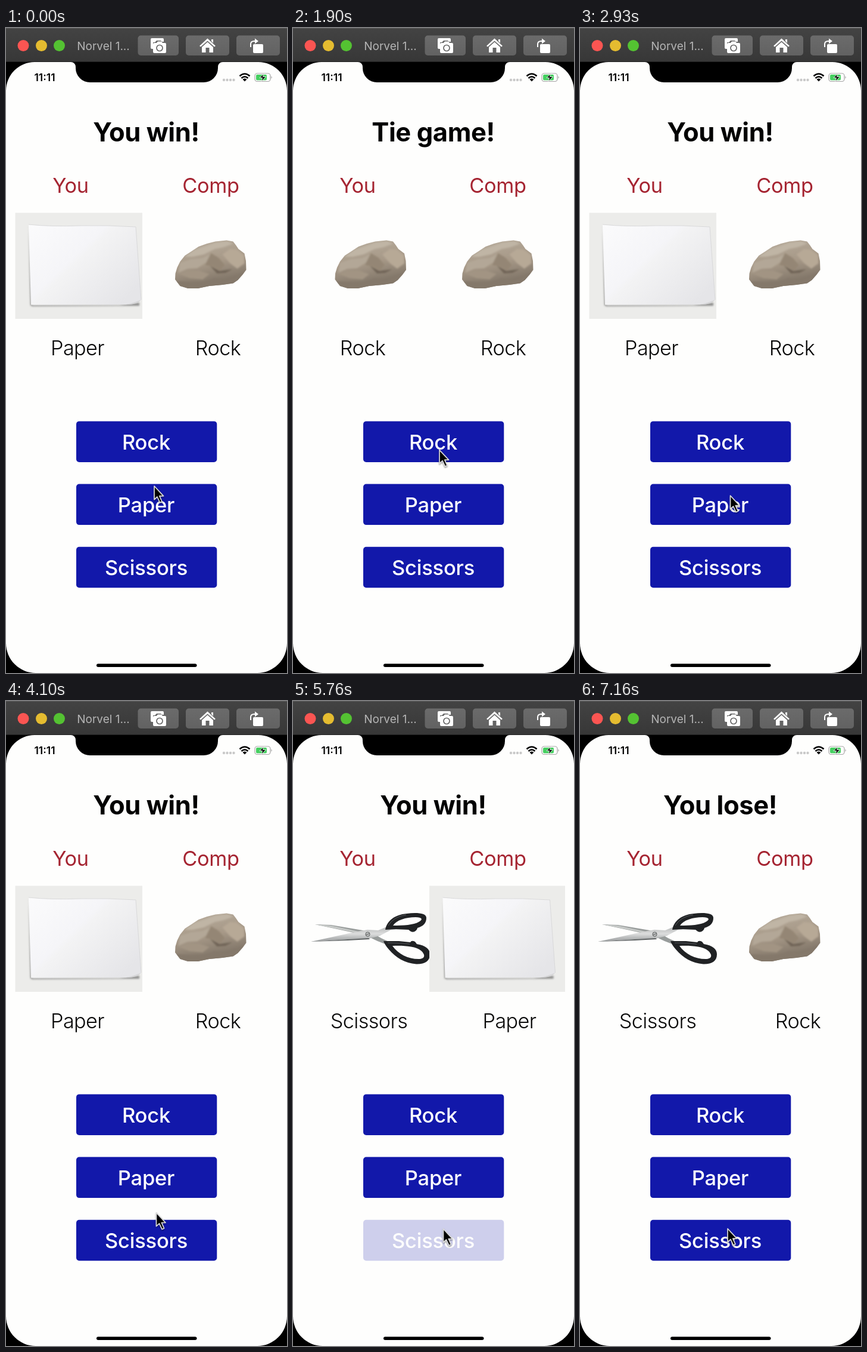
Animation of 472 by 1080 pixels, one loop 8660 ms. Source, as an HTML page:

```html
<!DOCTYPE html>
<html lang="en">
<head>
<meta charset="utf-8">
<title>Rock Paper Scissors</title>
<style>
  html, body { margin: 0; width: 100%; height: 100%; overflow: hidden; background: #000; }
  svg { display: block; width: 472px; height: 1080px; }
  text { font-family: Inter, Roboto, sans-serif; text-anchor: middle; }
  .title { font-size: 43.5px; font-weight: 700; letter-spacing: -.4px; }
  .head { font-size: 34.3px; letter-spacing: -.3px; fill: #a52431; }
  .label { font-size: 34.2px; font-weight: 300; letter-spacing: -.6px; fill: #080808; }
  .btn rect { fill: #1218aa; }
  .btn text { font-size: 34.5px; font-weight: 500; letter-spacing: -.2px; fill: #fff; }
</style>
</head>
<body>
<svg viewBox="0 0 472 1080">
  <defs>
    <linearGradient id="bar" x2="0" y2="1">
      <stop stop-color="#434343"/><stop offset="1" stop-color="#373737"/>
    </linearGradient>
    <linearGradient id="key" x2="0" y2="1">
      <stop stop-color="#6b6b6b"/><stop offset="1" stop-color="#626262"/>
    </linearGradient>
    <linearGradient id="sheet" x2="1" y2=".75">
      <stop stop-color="#fbfbfc"/><stop offset=".45" stop-color="#f5f5f8"/>
      <stop offset=".5" stop-color="#f3f3f4"/><stop offset="1" stop-color="#e5e5e8"/>
    </linearGradient>
    <linearGradient id="stone" x2=".3" y2="1">
      <stop stop-color="#b8ad9d"/><stop offset=".55" stop-color="#a79988"/><stop offset="1" stop-color="#7d7265"/>
    </linearGradient>
    <linearGradient id="steel" x2="0" y2="1">
      <stop stop-color="#b4b6b6"/><stop offset=".5" stop-color="#dcdddd"/><stop offset="1" stop-color="#96999a"/>
    </linearGradient>
    <filter id="soft" x="-20%" y="-20%" width="140%" height="140%"><feGaussianBlur stdDeviation="1.5"/></filter>
    <filter id="shade" x="-50%" y="-30%" width="200%" height="180%">
      <feDropShadow dx="0" dy="1.5" stdDeviation="1.2" flood-color="#000" flood-opacity=".45"/>
    </filter>
    <clipPath id="leftHalf"><path d="M0 300H229V500H0Z"/></clipPath>

    <path id="outline" d="M70.500 421L71 411 74 401 79 391 87 381 98 374 110 366 124 361 138 357.500 157 355.500 168 357.500 173 364 177 370 187 377.500 189.500 390 190 405 184 413 176 422 168 427.500 150 430 128 432 109 436 92 436 79 432Z"/>
    <clipPath id="stoneClip"><use href="#outline"/></clipPath>
    <g id="Rock">
      <use href="#outline" fill="url(#stone)"/>
      <g clip-path="url(#stoneClip)"><g filter="url(#soft)">
        <path fill="#c0b5a5" d="M86 383L104 371 139 359 158 357 168 361 152 367 137 370 119 379 100 383Z"/>
        <path fill="#b3a797" d="M79 393L98 387 117 385 129 379 123 392 108 402 91 403 76 410Z"/>
        <path fill="#948674" d="M131 377L144 385 154 397 146 406 133 399 121 397Z"/>
        <path fill="#b7a996" d="M150 379L163 370 174 371 186 380 187 394 175 403 163 394Z"/>
        <path fill="#a29483" d="M76 411L91 406 111 406 128 412 117 421 95 419Z"/>
        <path fill="#84786a" d="M70 424L95 425 119 426 137 419 157 422 178 413 188 408 173 426 148 432 121 435 98 439 80 434Z"/>
        <path fill="#6f6456" d="M129 398L145 407 167 404 155 410 141 411Z"/>
      </g></g>
    </g>

    <g id="Paper">
      <path fill="#ececea" d="M15.500 309.500H243.500V487H15.500Z"/>
      <path fill="#8c8c8b" filter="url(#soft)" d="M38 332L44 464 41 465ZM43 464L190 464 224 460 224 465 43 466Z"/>
      <path fill="url(#sheet)" d="M38 329Q76 333 126 331 172 330 218 333L227 455Q219 463 202 463L42 463.500Z"/>
      <path fill="#d5d5d7" d="M227 455Q220 464 201 463 216 460 227 455Z"/>
      <path fill="none" stroke="#d4d4d5" stroke-width=".8" d="M38 329Q76 333 126 331 172 330 218 333L227 455"/>
    </g>

    <g id="Scissors">
      <path fill="#989c9b" d="M37 374L64 375 129 386 148 397 163 404 155 407 142 402 121 392Z"/>
      <path fill="#c7cac8" d="M37 374L64 376 124 389 121 391Z"/>
      <path fill="url(#steel)" d="M30 403L108 386 125 383 143 384 160 377 200 378 198 382 165 383 146 393 127 398 92 399Z"/>
      <path fill="#626667" d="M30 403L92 399 127 397 129 399 92 401Z"/>
      <circle cx="125.500" cy="390.500" r="3.600" fill="#bfc2c2" stroke="#575a5a"/>
      <path d="M122.500 391.500L128.500 389.500" stroke="#555"/>
      <g fill="#202224" fill-rule="evenodd">
        <path d="M155 383C158 368 170 358 191 356 208 354 224 355 224 363 224 372 219 377 209 380 208 385 203 388 198 386L194 383 173 382ZM168 376C174 367 189 362 206 362 217 362 219 366 211 370 203 375 185 376 168 376Z"/>
        <path d="M152 402L178 402 197 404Q199 400 205 403L208 407C222 409 230 415 230 424 230 436 221 441 207 440.500 188 439 173 430 161 416 157 411 155 409 152 402ZM167 410C182 409 206 410 215 418 223 425 222 432 211 432 193 432 177 424 167 410Z"/>
      </g>
      <path fill="none" stroke="#55585b" d="M160 376Q169 361 190 358M159 405Q181 405 196 407"/>
    </g>
  </defs>

  <rect width="472" height="1080"/>
  <rect width="472" height="57" fill="url(#bar)"/>
  <path d="M0 .5H472" stroke="#5a5a5a"/>
  <path d="M0 56.500H472" stroke="#222"/>
  <circle cx="29" cy="29.500" r="9.500" fill="#fb5552"/>
  <circle cx="59.500" cy="29.500" r="9.500" fill="#e5bc30"/>
  <circle cx="89.500" cy="29.500" r="9.500" fill="#54c232"/>
  <text x="163.500" y="37" font-size="19" fill="#b5b5b5">Norvel 1...</text>
  <g fill="url(#key)">
    <rect x="221.500" y="12.500" width="68.500" height="33.500" rx="5"/>
    <rect x="302" y="12.500" width="73" height="33.500" rx="5"/>
    <rect x="387" y="12.500" width="73" height="33.500" rx="5"/>
  </g>
  <g fill="#fff">
    <path d="M245 17H263Q265 17 265 19V23H262L260 21H253L250 24H247V35H245Q243 35 243 33V19Q243 17 245 17Z"/>
    <path d="M250 25H253L255 22.500H261L263 25H267Q269 25 269 27V40Q269 42 267 42H249Q247 42 247 40V27Q247 25 249 25Z"/>
    <circle cx="258" cy="33.500" r="5" fill="none" stroke="#666" stroke-width="1.700"/>
    <path d="M338.500 17.500L352 30 350 31.500 338.500 21.500 327 31.500 325 30ZM345 19H348V25L345 22ZM338.500 23.500L348 32V41H341.500V33H335.500V41H329V32Z"/>
    <rect x="415" y="27" width="17" height="15" rx="2"/>
    <path d="M411 32V27Q411 22 417 22H420" fill="none" stroke="#fff" stroke-width="2"/>
    <path d="M418 17.500L424 22 418 26.500Z"/>
  </g>

  <path fill="#fefefd" d="M48 57H109A8 8 0 0 1 117 65V67A24 24 0 0 0 141 91H332A24 24 0 0 0 356 67V65A8 8 0 0 1 364 57H424A48 48 0 0 1 472 105V1030A50 50 0 0 1 422 1080H50A50 50 0 0 1 0 1030V105A48 48 0 0 1 48 57Z"/>
  <text x="65" y="89" font-size="17.500" font-weight="600">11:11</text>
  <g fill="#c9c9c9">
    <circle cx="366" cy="87" r="2.200"/><circle cx="371.500" cy="87" r="2.200"/>
    <circle cx="377" cy="87" r="2.200"/><circle cx="382.500" cy="87" r="2.200"/>
  </g>
  <g fill="none" stroke="#000" stroke-width="2.600">
    <path d="M392.500 80.500Q401 73 409.500 80.500M395.500 84Q401 79 406.500 84"/>
  </g>
  <path d="M397.500 86Q401 83 404.500 86L401 89.500Z"/>
  <rect x="418" y="76" width="26" height="13.500" rx="4" fill="none" stroke="#a5a5a5" stroke-width="1.200"/>
  <rect x="420" y="78" width="18" height="9.500" rx="2" fill="#45cf60"/>
  <path d="M445.500 80.500Q448 82.700 445.500 85Z" fill="#a5a5a5"/>
  <path d="M433 76.500L426 83.500H430.500L429 89.500 436.500 81.500H431.500Z" stroke="#fefefd" stroke-width=".8"/>

  <text id="title" class="title" x="235.500" y="190"></text>
  <text class="head" x="108.500" y="276">You</text>
  <text class="head" x="344" y="276">Comp</text>
  <use id="youPic"/>
  <use id="compPic" x="213.500"/>
  <text id="you" class="label" y="548"></text>
  <text id="comp" class="label" y="548"></text>
  <g id="buttons"></g>
  <rect x="152" y="1064.500" width="168.500" height="5.500" rx="2.750"/>
  <path id="cursor" filter="url(#shade)" stroke="#d8d8d8" stroke-width="1.700" stroke-linejoin="round"
    d="M1 1V23.500L6 19 10.500 28.500 14 27 9.800 17.600H16.500Z"/>
</svg>

<script>
const LOOP = 8660;
const $ = id => document.getElementById(id);

// start, title, your pick and label centre, computer pick and label centre
const rounds = [
  [0, 'You win!', 'Paper', 120, 'Rock', 356],
  [610, 'Tie game!', 'Rock', 117, 'Rock', 353],
  [2640, 'You win!', 'Paper', 120, 'Rock', 356],
  [4560, 'You win!', 'Scissors', 127.5, 'Paper', 363.5],
  [5900, 'You lose!', 'Scissors', 130.5, 'Rock', 366]
];

// button, press time, start of the fade back
const taps = [[0, 500, 650], [1, 2560, 2680], [2, 4480, 4620], [2, 5760, 5910]];

// time, x, y of the pointer tip
const path = [
  [0, 248, 766], [30, 248, 766], [360, 245, 705.5],
  [1890, 245, 705.5], [2430, 251.5, 782],
  [3710, 251.5, 782], [4350, 251.5, 888],
  [5310, 251.5, 888], [5460, 251.5, 883],
  [6710, 251.5, 883], [6830, 246, 883],
  [6999, 246, 883], [7000, 246.5, 882.5],
  [7159, 246.5, 882.5], [7160, 247, 882.5], [LOOP, 247, 882.5]
];

const buttons = ['Rock', 'Paper', 'Scissors'].map((name, i) => {
  const y = 658.4 + i * 105.2;
  $('buttons').insertAdjacentHTML('beforeend',
    `<g class="btn"><rect x="118" y="${y}" width="236.300" height="68.500" rx="5"/>` +
    `<text x="235.500" y="${y + 47.6}">${name}</text></g>`);
  return $('buttons').lastChild;
});

const ease = p => p < .5 ? 2 * p * p : 1 - 2 * (1 - p) ** 2;

function pointer(t) {
  const i = path.findIndex(k => k[0] > t);
  const [t0, x0, y0] = path[i - 1], [t1, x1, y1] = path[i];
  const p = ease((t - t0) / (t1 - t0));
  return [x0 + (x1 - x0) * p, y0 + (y1 - y0) * p];
}

function opacity(button, t) {
  const tap = taps.find(([b, down, up]) => b === button && t >= down && t < up + 250);
  return tap ? .2 + .8 * ease(Math.max(0, (t - tap[2]) / 250)) : 1;
}

function setLabel(id, name, x) {
  $(id).textContent = name;
  $(id).setAttribute('x', x);
  $(id + 'Pic').setAttribute('href', '#' + name);
}

let shown;
function showRound(round) {
  if (round === shown) return;
  shown = round;
  const [, title, you, youX, comp, compX] = round;
  $('title').textContent = title;
  setLabel('you', you, youX);
  setLabel('comp', comp, compX);
  if (you === 'Paper') $('youPic').setAttribute('clip-path', 'url(#leftHalf)');
  else $('youPic').removeAttribute('clip-path');
}

const start = performance.now();
function draw() {
  const t = (performance.now() - start) % LOOP;
  showRound(rounds.filter(r => r[0] <= t).pop());
  buttons.forEach((b, i) => b.setAttribute('opacity', opacity(i, t)));
  $('cursor').setAttribute('transform', `translate(${pointer(t)})`);
  requestAnimationFrame(draw);
}
draw();
</script>
</body>
</html>
```
